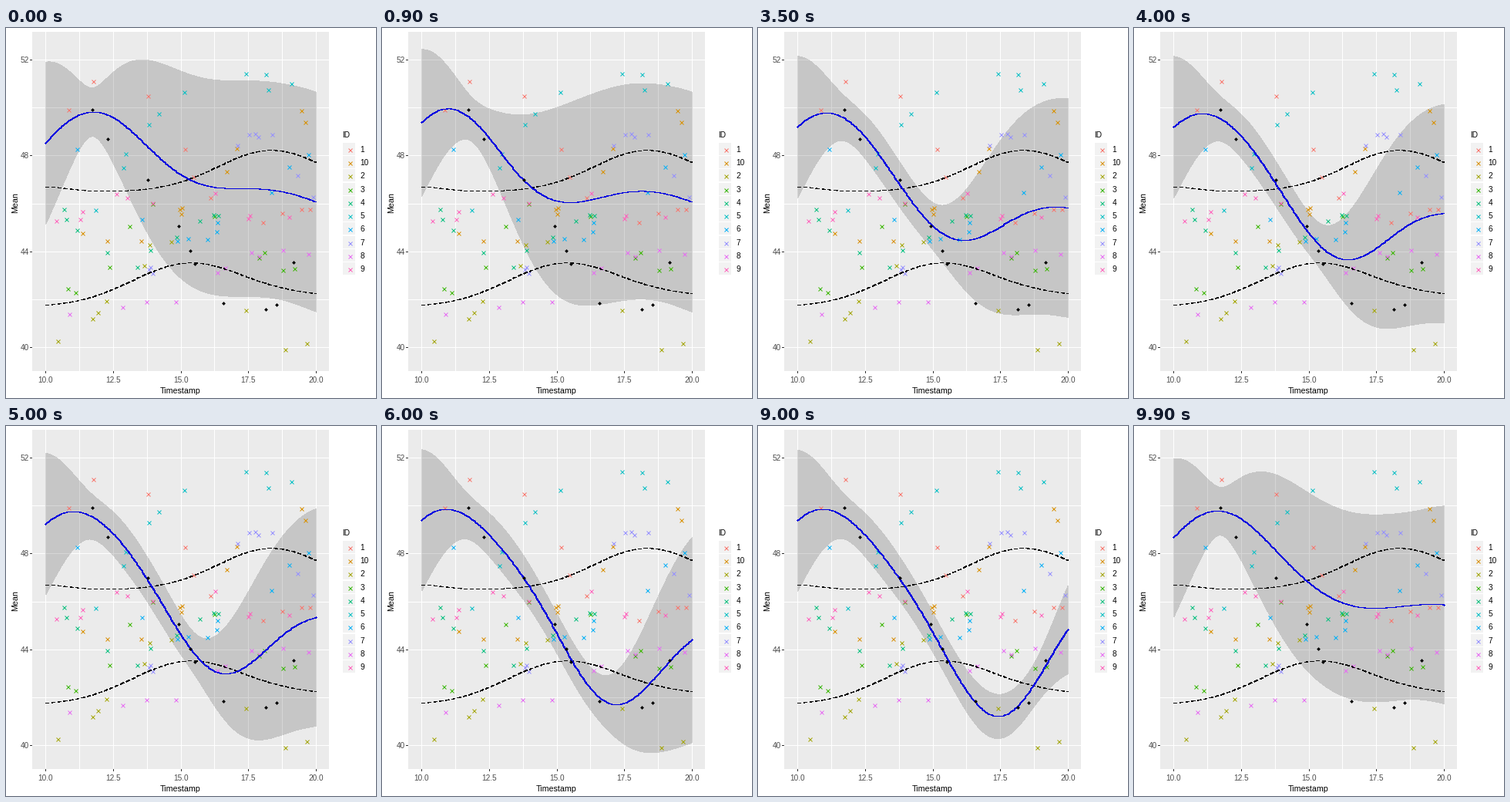
Write a matplotlib script that moves like this. It is 480x480 px and loops after 10000 ms.

```python
import numpy as np
import matplotlib.pyplot as plt
from matplotlib.animation import FuncAnimation

plt.rcParams["font.family"] = "Liberation Sans"
plt.rcParams["path.snap"] = False

SIZE = 480
NOISE = 0.0256
VARIANCE = 19.74
LEFT, RIGHT, TOP, BOTTOM = 34, 419, 5, 445


def px(x):
    return 51.3 + 35.05 * (np.asarray(x) - 10)


def py(v):
    return 41 + 31.1 * (52 - np.asarray(v))


# --- Model --------------------------------------------------------------

def bump(x, centre, width=8.7):
    return np.exp(-(x - centre) ** 2 / width)


def upper_mean(x):
    return 46.5 + 1.73 * bump(x, 18.35, 7.8) + 0.2 * bump(x, 10, 1.5)


def lower_mean(x):
    return 41.7 + 1.8 * bump(x, 15.3) + 0.4 * bump(x, 20)


def prior(x):
    return 0.7 * upper_mean(x) + 0.3 * lower_mean(x)


grid = np.linspace(10, 20, 201)
obs_x = np.array([11.70, 12.27, 13.76, 14.90, 15.33, 15.50, 16.54, 18.12, 18.52, 19.15])
obs_y = np.array([49.94, 48.72, 47.00, 45.08, 44.06, 43.50, 41.86, 41.60, 41.80, 43.57])


def state(n):
    """Gaussian process mean and half-width of its band after n observations."""
    x, y = obs_x[:n], obs_y[:n]
    cov = bump(x[:, None], x) + NOISE * np.eye(n)
    cross = bump(grid[:, None], x)
    gain = np.linalg.solve(cov, cross.T).T
    left_over = 1 + NOISE - (gain * cross).sum(axis=1)
    edge = 1.07 * bump(grid, 10, 0.8) + 0.73 * bump(grid, 20, 0.8)
    return np.array([prior(grid) + gain @ (y - prior(x)),
                     np.sqrt(VARIANCE * left_over + edge)])


states = [state(n) for n in range(1, 11)]

# --- Static parts -------------------------------------------------------

fig = plt.figure(figsize=(SIZE / 72, SIZE / 72), dpi=72, facecolor="white")
ax = fig.add_axes([0, 0, 1, 1])
# Whole numbers fall on pixel centres.
ax.set_xlim(-0.5, SIZE - 0.5)
ax.set_ylim(SIZE - 0.5, -0.5)
ax.axis("off")


def box(x, y, w, h, fill):
    ax.add_patch(plt.Rectangle((x - 0.5, y - 0.5), w, h, fc=fill, ec="none", zorder=0))


def rule(xs, ys, color):
    ax.plot(xs, ys, color=color, lw=1, zorder=1, solid_capstyle="butt")


def across(y, x0, x1, color="white"):
    rule([x0 - 0.5, x1 - 0.5], [y, y], color)


def down(x, y0, y1, color="white"):
    rule([x, x], [y0 - 0.5, y1 - 0.5], color)


def label(x, y, text, size=10, color="black", **kw):
    ax.text(x, y, text, fontsize=size, color=color, **kw)


def crosses(color, x, y):
    ax.plot(np.round(x), np.round(y), ls="none", marker="x", ms=5, mew=1,
            color=color, antialiased=False, zorder=3)


def curve(y, color, **kw):
    return ax.plot(np.round(px(grid)), np.round(py(y)), color=color, lw=1,
                   antialiased=False, **kw)[0]


box(LEFT, TOP, RIGHT - LEFT, BOTTOM - TOP, "#EBEBEB")

for v in range(40, 53, 2):
    y = np.round(py(v))
    across(y, LEFT, RIGHT)
    if v % 4 == 0:
        across(y, 31, LEFT, "#333333")
        label(29.5, y + 3.5, str(v), color="#4D4D4D", ha="right")

for v in np.arange(10, 20.1, 1.25):
    x = np.round(px(v))
    down(x, TOP, BOTTOM)
    if v % 2.5 == 0:
        down(x, BOTTOM, BOTTOM + 3, "#333333")
        label(x, 459, f"{v:.1f}", color="#4D4D4D", ha="center")

label(226, 473, "Timestamp", 10.6, ha="center")
label(12, 226.5, "Mean", 10.8, ha="center", va="center", rotation=90)
label(436, 142, "ID", 10)

# Each individual follows one bump: name, colour, base, height, centre.
PEOPLE = [
    ("1", "#F8766D", 45.7, 5.3, 12.3),
    ("10", "#D89000", 44.5, 5.6, 18.8),
    ("2", "#A3A500", 39.7, 4.6, 14.7),
    ("3", "#39B600", 42.2, 4.2, 15.4),
    ("4", "#00BF7D", 47.0, -3.4, 13.2),
    ("5", "#00BFC4", 51.3, -6.6, 10.6),
    ("6", "#00B0F6", 48.8, -4.6, 15.2),
    ("7", "#9590FF", 42.0, 7.0, 17.7),
    ("8", "#E76BF3", 41.8, 2.0, 18.5),
    ("9", "#FF62BC", 45.2, 1.3, 14.5),
]
rng = np.random.default_rng(4)
for i, (name, color, base, height, centre) in enumerate(PEOPLE):
    t = rng.uniform(10, 20, 10)
    v = base + height * bump(t, centre) + rng.normal(0, 0.3, 10)
    crosses(color, px(t), py(v))

    y = round(156.7 + 17.28 * i)
    box(437, y - 8, 16, 16, "#F2F2F2")
    crosses(color, 445, y)
    label(459, y + 3.5, name)

for mean in (upper_mean, lower_mean):
    curve(mean(grid), "black", ls=(0, (4, 3)), dash_capstyle="butt", zorder=4)

ax.plot(np.round(px(obs_x)), np.round(py(obs_y)), ls="none", marker="D", ms=3.4,
        mew=0, color="black", antialiased=False, zorder=6)

# --- Moving parts -------------------------------------------------------

band = plt.Polygon(np.zeros((3, 2)), fc="#333333", alpha=0.2, lw=0,
                   antialiased=False, zorder=2)
ax.add_patch(band)
blue = curve(states[0][0], "#0000E0", zorder=5)


def draw(i):
    # Each second: hold for a while, then move evenly to the next state.
    k, j = divmod(i, 10)
    start = 3 if k == 0 else 4
    t = max(0, (j - start) / (10 - start))
    mean, half = (1 - t) * states[k] + t * states[(k + 1) % 10]
    blue.set_ydata(np.round(py(mean)))
    x = px(grid)
    band.set_xy(np.column_stack([
        np.concatenate([x, x[::-1]]),
        np.concatenate([py(mean + half), py(mean - half)[::-1]])]))
    return band, blue


anim = FuncAnimation(fig, draw, frames=100, interval=100, repeat=True, repeat_delay=0)
plt.show()
```
